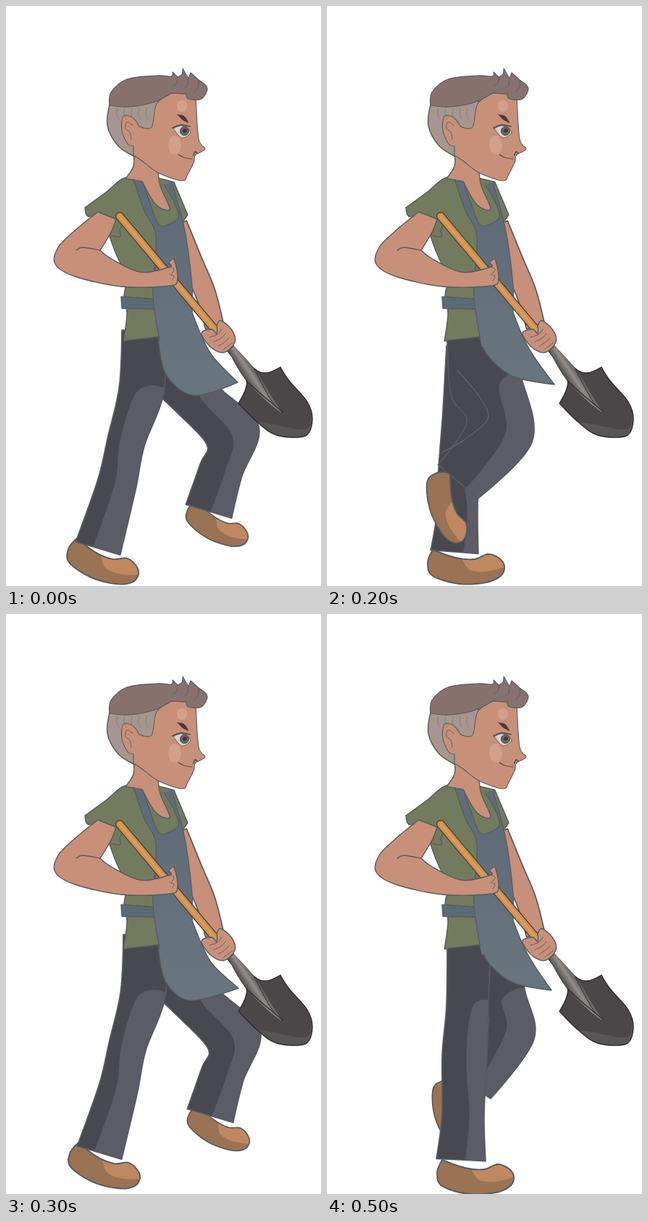
Write an HTML page that moves like this. It is 435 px wide and 800 px high and loops after 0.6 s.

```html
<!DOCTYPE html>
<html lang="en">
<head>
<meta charset="utf-8">
<title>Walking gardener</title>
<style>
html, body { margin: 0; width: 100%; height: 100%; overflow: hidden; background: #fff; }
svg { display: block; width: 100%; height: 100%; }
path { stroke-linejoin: round; stroke-linecap: round; }
.pose { visibility: hidden; animation: show 600ms step-end infinite; }
@keyframes show {
  0% { visibility: visible; }
  16.666%, 100% { visibility: hidden; }
}
</style>
</head>
<body>
<svg viewBox="0 0 435 800">
  <defs>
    <linearGradient id="steel" gradientUnits="userSpaceOnUse" x1="320" y1="500" x2="338" y2="488">
      <stop offset="0" stop-color="#4b4747"/><stop offset=".5" stop-color="#928d8a"/><stop offset="1" stop-color="#4f4a4a"/>
    </linearGradient>
    <linearGradient id="cloth" gradientUnits="userSpaceOnUse" x1="0" y1="300" x2="0" y2="500">
      <stop offset="0" stop-color="#606d79"/><stop offset="1" stop-color="#68747e"/>
    </linearGradient>
  </defs>
  <g id="walk"></g>
  <g id="body"></g>
</svg>
<script>
const NS = 'http://www.w3.org/2000/svg';
const INK = '#565b60', SKIN = '#c89079', SHIRT = '#727b5d', STRAP = '#5c6a77', IRON = '#302e30';
let clips = 0;

function add(parent, tag, attrs) {
  const el = document.createElementNS(NS, tag);
  for (const k in attrs) el.setAttribute(k, attrs[k]);
  return parent.appendChild(el);
}

// Smooth curve through "x y" points; "!" marks a sharp corner.
function curve(text, open) {
  const p = [...text.matchAll(/(-?[\d.]+) (-?[\d.]+)(!?)/g)].map(m => [+m[1], +m[2], m[3]]);
  const n = p.length, at = i => open ? p[Math.max(0, Math.min(n - 1, i))] : p[(i + n) % n];
  const handle = (i, s) => [0, 1].map(k =>
    (at(i)[k] + (at(i)[2] ? 0 : s * (at(i + 1)[k] - at(i - 1)[k]) / 6)).toFixed(1));
  let d = `M${p[0][0]} ${p[0][1]}`;
  for (let i = 0; i < (open ? n - 1 : n); i++)
    d += `C${handle(i, 1)} ${handle(i + 1, -1)} ${at(i + 1)[0]} ${at(i + 1)[1]}`;
  return open ? d : d + 'Z';
}

function line(g, pts, w = 1.2, ink = INK) {
  add(g, 'path', { d: curve(pts, true), fill: 'none', stroke: ink, 'stroke-width': w });
}

// Filled outline with one shade clipped inside it.
function part(g, pts, fill, { shade, tone, w = 1.4, ink = INK } = {}) {
  const d = curve(pts), id = 'c' + clips++;
  add(g, 'path', { d, fill });
  if (shade) {
    add(add(g, 'clipPath', { id }), 'path', { d });
    add(g, 'path', { d: curve(shade), fill: tone, 'clip-path': `url(#${id})` });
  }
  if (w) add(g, 'path', { d, fill: 'none', stroke: ink, 'stroke-width': w });
}

// Sides of a limb given as joints [x, y, half width]; side runs from -1 (back) to 1 (front).
function edge(joints, side) {
  return joints.map(([x, y, r], i) => {
    const a = joints[Math.max(0, i - 1)], b = joints[Math.min(joints.length - 1, i + 1)];
    const dx = b[0] - a[0], dy = b[1] - a[1], k = r * side(i) / Math.hypot(dx, dy);
    const corner = i % (joints.length - 1) ? '' : '!';
    return `${x + dy * k} ${y - dx * k}${corner}`;
  });
}

function limb(g, joints, fill, lit) {
  const front = edge(joints, () => 1), back = edge(joints, () => -1);
  const style = { w: 1.7 };
  if (lit !== undefined) {
    const inner = edge(joints, i => lit + 0.12 * Math.sin(i * 2.4));
    style.tone = '#5c5c66';
    style.shade = [...inner.slice(1), ...edge(joints, () => 1.3).slice(1).reverse()].join(' ');
  }
  part(g, [...back, ...front.reverse()].join(' '), fill, style);
}

const leg = (g, lit, ...joints) => limb(g, joints, '#484950', lit);

function shoe(g, x, y, turn, size = 1) {
  const s = add(g, 'g', { transform: `translate(${x} ${y}) rotate(${turn}) scale(${size})` });
  part(s, '-46 -22! -53 -4 -46 14 -10 25 28 23 48 14 53 1 46 -10 30 -16 12 -9 -14 -11', '#9a7254',
    { shade: '-3 -16 1 2 14 8 34 7 60 -4 40 -24', tone: '#bf8860', w: 1.9 });
}

function skirt(g, tip, low, side) {
  part(g, `204 425! 256 420! 270 455 286 484 ${tip}! ${low} ${side} 210 455!`, 'url(#cloth)');
}

function lunge(g) {
  shoe(g, 134, 768, 17, .97);
  shoe(g, 292, 716, 24, .87);
  leg(g, .1, [215, 480, 45], [262, 540, 33], [313, 592, 38], [297, 640, 30], [280, 697, 33]);
  leg(g, -.2, [190, 448, 30], [187, 530, 31], [166, 600, 26], [153, 660, 27], [127, 748, 32]);
}

function stride(g) {
  shoe(g, 52, 743, 66, .97);
  shoe(g, 355, 770, -20, .95);
  leg(g, .2, [235, 490, 40], [256, 553, 33], [288, 640, 32], [314, 700, 28], [331, 762, 32]);
  leg(g, .25, [194, 448, 32], [190, 525, 37], [172, 595, 38], [138, 655, 34], [58, 711, 39]);
}

function passFar(g) {
  leg(g, .4, [195, 470, 30], [190, 560, 30], [182, 640, 28], [180, 700, 28], [176, 753, 33]);
  shoe(g, 192, 772, 0);
  shoe(g, 167, 692, 68, .95);
  leg(g, .3, [203, 448, 38], [220, 525, 50], [238, 588, 47], [181, 656, 36]);
  line(g, '180 503 210 538 222 569 190 598 160 615', 1.2, '#65676a');
}

function passNear(g) {
  shoe(g, 170, 688, 72, .85);
  leg(g, -.1, [225, 470, 35], [243, 530, 32], [254, 578, 33], [205, 655, 25]);
  shoe(g, 205, 775, 0);
  leg(g, .2, [196, 448, 30], [194, 540, 29], [190, 610, 31], [188, 690, 29], [185, 753, 34]);
}

// Six held poses: drawing, nudge, then the apron's tip, low point and back edge.
const walk = document.getElementById('walk');
[
  [lunge, '0 0', '320 519', '260 537', '221 508'],
  [stride, '0 0', '315 521', '264 524', '217 487'],
  [passFar, '0 0', '314 522', '257 511', '222 482'],
  [lunge, '2 -5', '321 516', '254 533', '220 506'],
  [stride, '3 3', '318 523', '264 523', '221 484'],
  [passNear, '0 0', '310 519', '256 508', '224 482']
].forEach(([draw, nudge, ...hem], i) => {
  const g = add(walk, 'g', { class: 'pose', style: `animation-delay:${i * 100 - 600}ms` });
  draw(add(g, 'g', { transform: `translate(${nudge})` }));
  skirt(g, ...hem);
});

const b = document.getElementById('body');

// Far arm, shirt, neck and apron
limb(b, [[238, 300, 12], [254, 350, 16], [275, 395, 14], [288, 442, 13]], SKIN);
part(b, '164 237 138 257 109 278! 113 290 130 288 152 294! 143 318! 152 342 166 375 163 400 167 425 162 462! 214 456! 250 400 238 306! 251 288! 232 243! 200 236', SHIRT);
line(b, '146 317 158 318 157 309 161 302');
part(b, '159 401! 205 404! 207 418! 160 417!', STRAP);
part(b, '165 238! 176 221 176 204! 210 225! 213 248 226 280 207 274 188 242!', SKIN);
part(b, '176 239! 189 243! 199 272 213 303 238 292! 232 270 218 246! 229 243! 247 310 257 385 257 426! 264 450! 214 470! 203 400 207 336 205 308! 191 282', 'url(#cloth)', { w: 0 });
line(b, '189 243 199 272 213 303 238 292 232 270 218 246');
line(b, '229 243 247 310 257 385 257 422');
line(b, '176 239 191 282 205 308 207 336 203 400 212 462');

// Head
part(b, '143 136! 140 165 154 192 176 207! 203 168 210 128!', '#a6968f');
part(b, '229 120! 208 135 201 167 184 166! 175 154 162 152 160 172 168 190 176 193! 176 206! 187 213 210 230 243 241 251 232 260 214! 262 205 275 197 266 183 262 122!', SKIN, { w: 1.1 });
line(b, '176 165 167 160 165 169 171 174 173 184', .9);
for (let x = 154; x < 200; x += 10)
  line(b, `${x} 141 ${x - 1} 149 ${x + 2} 156`, .7, '#837570');
for (const [cx, cy, rx, ry] of [[233, 192, 9, 13], [243, 138, 7, 8]])
  add(b, 'ellipse', { cx, cy, rx, ry, fill: '#d2a08b' });
part(b, '143 137! 145 119 167 101 208 96 228 97 230 91! 237 98! 243 94 244 86! 252 100! 255 92! 266 102! 278 113 270 128 252 128 249 121! 229 120! 203 133 170 139', '#87716d', { w: 1.1 });
for (let i = 0; i < 3; i++)
  line(b, `${237 + i * 14.5} ${98 + i * 2} ${236 + i * 15} ${106 + i * 2} ${231 + i * 15} ${110 + i * 4}`, .8);
part(b, '237 150! 246 152 252 161! 244 157', '#4a3a37', { w: .6, ink: '#4a3a37' });
part(b, '231 169! 243 165 255 174 243 182', '#d9d3ca', { w: 1 });
add(b, 'circle', { cx: 246.5, cy: 172.5, r: 6, fill: '#6c6461', stroke: '#494748' });
add(b, 'circle', { cx: 247, cy: 172, r: 2.8, fill: '#3c393b' });
line(b, '230 168 241 164 254 166', 1.5, '#494748');
line(b, '238 205 246 209 257 211', 1.2, '#5f4b47');
line(b, '259 206 261 201 264 203', 1.7, '#5f4b47');

// Shovel
part(b, '306 476! 314 469! 343 500 360 506 379 498! 391 517 416 546 423 571 413 593 374 592 347 574 321 548! 331 528 330 510', '#4b4648',
  { shade: '344 574 412 584 422 565 427 598 365 599', tone: '#5a5555', ink: IRON });
part(b, '307 476! 315 469! 343 500 366 537 379 560 334 520', 'url(#steel)', { w: 0 });
line(b, '332 517 352 535 382 560', 1.2, IRON);
line(b, '343 501 362 537 373 553', 1, IRON);
for (const [w, ink] of [[12, '#4a3a2c'], [9.5, '#cd9052'], [4, '#d69d5d']])
  line(b, '157 290 289 447', w, ink);

// Hands and near arm
part(b, '291 441! 297 434 312 447 316 464 300 478 281 469 270 451 284 446 291 452', SKIN);
for (let i = 0; i < 4; i++)
  line(b, `${298 + i * 5} ${446 + i * 6} ${292 + i * 4} ${453 + i * 6} ${281 + i * 6} ${457 + i * 6}`, .9);
part(b, '127 284! 97 308 72 333 68 356 95 373 160 387 226 386 237 376 232 350 225 354 226 360 186 367 146 349 130 337! 145 312 152 294!', SKIN);
line(b, '97 337 106 333 130 337', 1.3);
for (const y of [360, 370])
  line(b, `226 ${y} 232 ${y + 3} 229 ${y + 9}`, .9);
</script>
</body>
</html>
```
